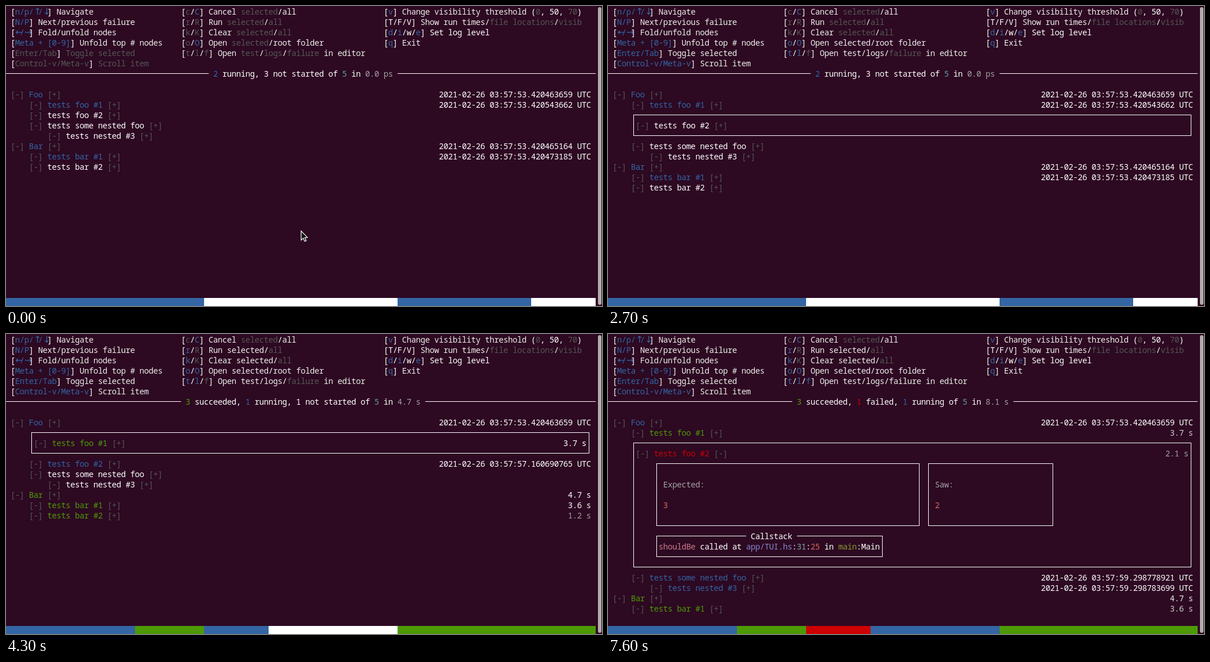
Animation, 1035 px wide and 522 px high, one loop 8000 ms. Source, as an HTML page with a canvas:

```html
<!DOCTYPE html>
<html lang="en">
<head>
<meta charset="utf-8">
<title>Test runner terminal</title>
<style>
html, body { margin: 0; width: 1035px; height: 522px; overflow: hidden; background: #2d0922; }
canvas { display: block; }
</style>
</head>
<body>
<canvas id="stage" width="1035" height="522"></canvas>
<script>
const ctx = document.getElementById('stage').getContext('2d');
const LOOP = 8000, CW = 8, RH = 18, COLS = 128, LAST_ROW = 26;
const BG = '#2d0922';
const MONO = '14px "Noto Sans Mono", "DejaVu Sans Mono", monospace';
const ARROWS = '16px "DejaVu Sans", sans-serif';

// Colour codes used in markup: "~b" switches to blue, and so on.
const COLORS = {
  w: '#ffffff', m: '#eeeeec', d: '#555753', b: '#3465a4', g: '#4e9a06', r: '#cc0000',
  c: '#5f9ea0', a: '#a2a2a2', p: '#cc7a8b', v: '#8585cc', t: '#7fa5a5', s: '#d9695f', o: '#8a9a30'
};
const STATE_COLOR = { waiting: 'w', running: 'b', ok: 'g', failed: 'r' };

const DAY = '2021-02-26 03:57:';
const node = (name, level, start, stamp, end, secs, result, width, group) =>
  ({ name, level, start, stamp: DAY + stamp + ' UTC', end, secs, result, width, group });
const nodes = [
  node('Foo', 0, 0, '53.420463659', Infinity, 0, '', 224, true),
  node('tests foo #1', 1, 0, '53.420543662', 3200, 3.7, 'ok', 120),
  node('tests foo #2', 1, 3200, '57.160690765', 5300, 2.1, 'failed', 112),
  node('tests some nested foo', 1, 5300, '59.298778921', Infinity, 0, '', 112, true),
  node('tests nested #3', 2, 5300, '59.298783699', Infinity, 0, '', 112),
  node('Bar', 0, 0, '53.420465164', 4100, 4.7, 'ok', 120, true),
  node('tests bar #1', 1, 0, '53.420473185', 3000, 3.6, 'ok', 112),
  node('tests bar #2', 1, 3000, '57.00414541', 4100, 1.2, 'ok', 112)
];

// [time, value] steps
const SELECTION = [[0, -1], [1300, 0], [2200, 1], [2700, 2], [3200, 3], [3900, 2], [4300, 1], [6900, 2]];
const OPENED = [[0, -1], [5200, 1], [6400, -1], [7600, 2]];
const ELAPSED = [[0, 0], [3000, 3.6], [3200, 3.7], [4100, 4.7], [5300, 5.9], [6400, 7.1], [7600, 8.1]];
const at = (steps, t) => steps.filter(s => s[0] <= t).pop()[1];

const stateOf = (n, t) => t < n.start ? 'waiting' : t < n.end ? 'running' : n.result;
const plain = s => s.replace(/~./g, '');

function write(col, row, markup, color = COLORS.w) {
  ctx.fillStyle = color;
  const chars = [...markup];
  for (let i = 0; i < chars.length; i++) {
    if (chars[i] === '~') { ctx.fillStyle = COLORS[chars[++i]]; continue; }
    const arrow = '←→↑↓'.includes(chars[i]);
    ctx.font = arrow ? ARROWS : MONO;
    ctx.textAlign = arrow ? 'left' : 'center';
    ctx.fillText(chars[i], col * CW + (arrow ? 0 : CW / 2), row * RH + 15);
    col++;
  }
}

function fill(color, x, y, w, h) {
  ctx.fillStyle = color;
  ctx.fillRect(x, y, w, h);
}

// Box lines run through the centres of the border cells.
function box(col1, row1, col2, row2) {
  ctx.strokeStyle = '#fff';
  ctx.lineWidth = 1;
  ctx.strokeRect(col1 * CW + 4.5, row1 * RH + 9.5, (col2 - col1) * CW, (row2 - row1) * RH);
}

function header(sel, state) {
  const any = sel >= 0, done = state === 'ok' || state === 'failed';
  const key = (on, k) => (on ? '~b' : '~d') + k + '~w';
  const msg = (on, s) => (on ? '~m' : '~d') + s + '~w';
  const pair = (a, b, k) => `[${key(a, k)}/${key(b, k.toUpperCase())}] `;
  const cancel = state === 'running', failed = state === 'failed';
  const columns = [
    [1, [
      '[~bn/p/↑/↓~w] ~mNavigate',
      '[~bN/P~w] ~mNext/previous failure',
      '[~b←/→~w] ~mFold/unfold nodes',
      '[~bMeta + [0-9]~w] ~mUnfold top # nodes',
      `[${key(any, 'Enter/Tab')}] ${msg(any, 'Toggle selected')}`,
      `[${key(any, 'Control-v/Meta-v')}] ${msg(any, 'Scroll item')}`
    ]],
    [38, [
      pair(cancel, true, 'c') + `~mCancel ${msg(cancel, 'selected')}/~mall`,
      pair(done, false, 'r') + `~mRun ${msg(done, 'selected')}/~dall`,
      pair(done, false, 'k') + `~mClear ${msg(done, 'selected')}/~dall`,
      pair(any, true, 'o') + `~mOpen ${msg(any, 'selected')}/~mroot folder`,
      `[${key(any, 't')}/${key(any, 'l')}/${key(failed, 'f')}] ~mOpen ` +
        `${msg(any, 'test')}/${msg(any, 'logs')}/${msg(failed, 'failure')} ~min editor`
    ]],
    [82, [
      '[~bv~w] ~mChange visibility threshold ~w(~d0~w, 50, ~d70~w)',
      '[T/F/V] ~mShow run times~w/~dfile locations~w/~dvisib',
      '[~bd~w/~bi~w/w/~be~w] Set log level',
      '[~bq~w] ~mExit'
    ]]
  ];
  for (const [col, lines] of columns) lines.forEach((line, row) => write(col, row, line));
}

function status(t, total) {
  const tests = nodes.filter(n => !n.group);
  const parts = [['ok', 'succeeded'], ['failed', 'failed'], ['running', 'running'], ['waiting', 'not started']]
    .map(([state, label]) => [tests.filter(n => stateOf(n, t) === state).length, label, STATE_COLOR[state]])
    .filter(p => p[0])
    .map(([count, label, color]) => `~${color}${count}~w ${label}`);
  const time = total ? total.toFixed(1) + ' s' : '0.0 ps';
  const text = `${parts.join(', ')} of ~c${tests.length}~w in ~a${time}`;
  const width = plain(text).length + 2, left = Math.ceil((COLS - width) / 2);
  fill('#fff', 0, 117, left * CW, 1);
  fill('#fff', (left + width) * CW, 117, (COLS - left - width) * CW, 1);
  write(left + 1, 6, text);
}

function failure(row) {
  box(10, row, 67, row + 6);
  box(69, row, 96, row + 6);
  write(12, row + 2, '~aExpected:');
  write(12, row + 4, '~s3');
  write(71, row + 2, '~aSaw:');
  write(71, row + 4, '~s2');
  box(10, row + 7, 59, row + 9);
  fill(BG, 30 * CW, (row + 7) * RH + 8, 11 * CW, 3);
  write(31, row + 7, 'Callstack');
  write(11, row + 8, '~pshouldBe~w called at ~vapp/TUI.hs~w:~t31~w:~s25~w in ~omain~w:Main');
}

function tree(t, sel, total) {
  const open = at(OPENED, t);
  let row = 8;
  nodes.forEach((n, i) => {
    const picked = i === sel, inset = picked ? 1 : 0, state = stateOf(n, t);
    const col = 1 + 4 * n.level, top = row;
    row += inset;
    if (row > LAST_ROW) return;
    write(col + inset, row, `~d[-] ~${STATE_COLOR[state]}${n.name}~d [${i === open ? '-' : '+'}]`);
    if (state !== 'waiting') {
      const finished = state !== 'running';
      const label = finished ? n.secs.toFixed(1) + ' s' : n.stamp;
      // Shorter runs are shown in a darker grey.
      const grey = finished ? Math.min(255, Math.round(100 + 235 * n.secs / total)) : 255;
      write(127 - inset - label.length, row, label, `rgb(${grey},${grey},${grey})`);
    }
    row++;
    if (i === open) {
      if (state === 'failed') failure(row);
      row += state === 'failed' ? 10 : 1;
    }
    if (picked) box(col, top, 126, row++);
  });
}

function progress(t) {
  let x = 0;
  for (const n of nodes) {
    fill(COLORS[STATE_COLOR[stateOf(n, t)]], x, 508, n.width, 14);
    x += n.width;
  }
}

function pointer() {
  ctx.beginPath();
  [[0, 0], [0, 16], [3.7, 12.6], [6.2, 18], [8.8, 17], [6.4, 11.6], [11, 11.2]]
    .forEach(([x, y]) => ctx.lineTo(512.5 + x, 391.5 + y));
  ctx.closePath();
  ctx.fillStyle = '#111';
  ctx.fill();
  ctx.strokeStyle = '#fff';
  ctx.lineWidth = 1.2;
  ctx.stroke();
}

function draw() {
  const t = performance.now() % LOOP;
  const sel = at(SELECTION, t), total = at(ELAPSED, t);
  fill(BG, 0, 0, 1035, 522);
  header(sel, sel < 0 ? '' : stateOf(nodes[sel], t));
  status(t, total);
  tree(t, sel, total);
  progress(t);
  ctx.fillStyle = '#b3adaa';
  ctx.beginPath();
  ctx.roundRect(1028, 2, 6, 518, 3);
  ctx.fill();
  if (t < 1100) pointer();
  requestAnimationFrame(draw);
}
draw();
</script>
</body>
</html>
```
